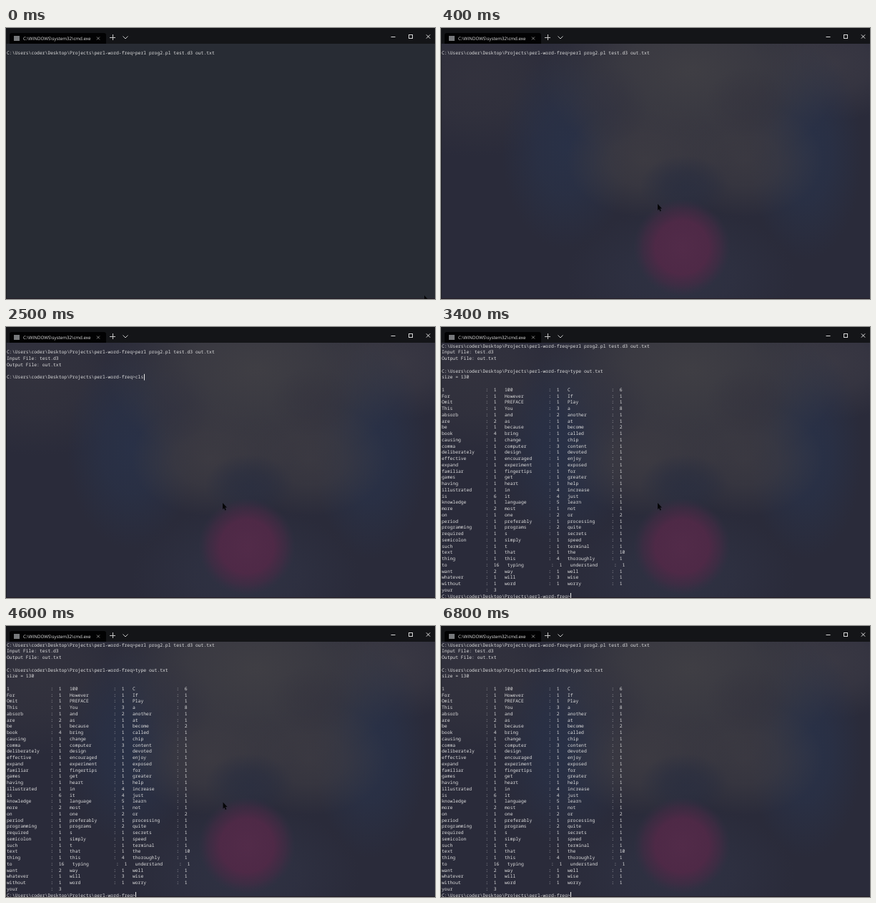
Recreate the animation shown at these times as an HTML page with a canvas. Size 600x379 px, loop 7.2 s.

```html
<!DOCTYPE html>
<html lang="en">
<head>
<meta charset="utf-8">
<title>Terminal</title>
<style>
html, body { margin: 0; width: 100%; height: 100%; overflow: hidden; background: #282c34; }
canvas { display: block; }
</style>
</head>
<body>
<canvas id="stage" width="600" height="379"></canvas>
<script>
const W = 600, H = 379, LOOP = 7200, STEP = 100, BAR = 22;
const CELL = 3.83, ROW = 8.75, LEFT = 1, FIRST = 26.4;
const ctx = document.getElementById('stage').getContext('2d');

const PROMPT = 'C:\\Users\\coder\\Desktop\\Projects\\perl-word-freq>';
const RUN = 'perl prog2.pl test.d3 out.txt';
const TYPE = 'type out.txt';
const REPORT = ['Input File: test.d3', 'Output File: out.txt', ''];

// Words with their counts; a missing count means 1.
const WORDS = `1 100 C=6 For However If Omit PREFACE Play This You=3 a=8
absorb and=2 another are=2 as at be because become=2 book=4 bring called
causing change chip comma computer=3 content deliberately design devoted
effective encouraged enjoy expand experiment exposed familiar fingertips for
games get greater having heart help illustrated in=4 increase is=6 it=4 just
knowledge language=5 learn more=2 most not on one=2 or=2 period preferably processing
programming programs=2 quite required s secrets semicolon simply speed such t terminal
text that the=10 thing this=4 thoroughly to=16 typing understand want=2 way well
whatever will=3 wise without word worry your=3`.split(/\s+/);

function wordTable() {
  const cells = WORDS.map(entry => {
    const [word, count = '1'] = entry.split('=');
    return word.padEnd(16) + ':  ' + count + '   ';
  });
  const rows = [];
  for (let i = 0; i < cells.length; i += 3) rows.push(cells.slice(i, i + 3).join(''));
  return rows;
}

const LISTING = [PROMPT + RUN, ...REPORT, PROMPT + TYPE, 'size = 130', '', ...wordTable(), PROMPT];

// Terminal content: [start time, lines, caret shown]
const shell = input => ['', PROMPT + RUN, ...REPORT, PROMPT + input];
const SCREENS = [
  [0, ['', PROMPT + RUN], false],
  [1300, shell(''), true],
  [1800, shell(RUN), true],
  [2300, shell(TYPE), true],
  [2500, shell('cls'), true],
  [2900, shell(TYPE), true],
  [3400, LISTING, true],
  [4000, LISTING, false],
  [4600, LISTING, true],
  [5100, LISTING, false],
  [5700, LISTING, true],
  [6200, LISTING, false],
  [6800, LISTING, true]
];

// Pointer path: [time, x, y]
const PATH = [
  [0, 585, 374], [300, 303, 246], [4500, 303, 246], [4600, 303.5, 246.5],
  [4900, 303.5, 246.5], [5300, 305, 248], [5400, 305, 248], [5700, 308, 250],
  [5900, 308, 250], [6000, 309, 258], [6300, 312, 380], [LOOP, 312, 380]
];

// Wallpaper glow: [x, y, rx, ry, rgb, strength]
const GLOWS = [
  [45, 70, 150, 110, '54,53,63', .7],
  [550, 50, 110, 80, '62,60,70', .75],
  [175, 170, 90, 140, '41,50,73', .85],
  [510, 175, 80, 150, '41,50,73', .9],
  [350, 60, 210, 140, '63,62,68', 1],
  [285, 185, 110, 80, '62,60,67', .9],
  [425, 185, 110, 80, '62,60,67', .8],
  [235, 110, 55, 60, '51,51,64', .5],
  [430, 105, 60, 50, '52,51,62', .5],
  [340, 222, 62, 44, '43,47,64', .9],
  [335, 350, 160, 100, '49,52,70', .7]
];

function glow(x, y, rx, ry, stops) {
  ctx.save();
  ctx.translate(x, y);
  ctx.scale(rx, ry);
  const fill = ctx.createRadialGradient(0, 0, 0, 0, 0, 1);
  stops.forEach(([at, color]) => fill.addColorStop(at, color));
  ctx.fillStyle = fill;
  ctx.fillRect(-1, -1, 2, 2);
  ctx.restore();
}

function rect(color, x, y, w, h) {
  ctx.fillStyle = color;
  ctx.fillRect(x, y, w, h);
}

function stroke(color, width, ...lines) {
  ctx.strokeStyle = color;
  ctx.lineWidth = width;
  ctx.beginPath();
  for (const line of lines) line.forEach(([x, y], i) => i ? ctx.lineTo(x, y) : ctx.moveTo(x, y));
  ctx.stroke();
}

const cross = (x, y, r) => [
  [[x - r, y - r], [x + r, y + r]],
  [[x + r, y - r], [x - r, y + r]]
];

function drawWallpaper(alpha) {
  if (!alpha) return;
  ctx.globalAlpha = alpha;
  rect('#2a2b3a', 0, 0, W, H);
  for (const [x, y, rx, ry, rgb, k] of GLOWS) {
    glow(x, y, rx, ry, [[0, `rgba(${rgb},${k})`], [.45, `rgba(${rgb},${k * .75})`], [1, `rgba(${rgb},0)`]]);
  }
  glow(337, 307, 68, 68, [
    [0, 'rgba(82,43,73,1)'], [.55, 'rgba(80,41,71,.95)'],
    [.8, 'rgba(72,42,69,.55)'], [1, 'rgba(60,45,68,0)']
  ]);
  ctx.globalAlpha = 1;
}

function drawTitleBar() {
  rect('#141518', 0, 0, W, BAR);
  ctx.fillStyle = '#020203';
  ctx.beginPath();
  ctx.roundRect(5, 7, 135, BAR - 7, [3, 3, 0, 0]);
  ctx.fill();
  rect('#77797c', 11, 11, 8, 7);

  ctx.font = '6.2px "Open Sans", sans-serif';
  ctx.fillStyle = '#e6e6e6';
  ctx.fillText('C:\\WINDOWS\\system32\\cmd.exe', 24, 17);

  stroke('#a0a0a0', .8, ...cross(129, 14.5, 2));
  stroke('#c8c8c8', 1, [[145, 13.5], [153, 13.5]], [[149.5, 9], [149.5, 17]]);
  stroke('#c8c8c8', 1, [[163.5, 11.5], [167, 15], [170.5, 11.5]]);
  stroke('#d8d8d8', 1, [[538.5, 12.5], [544.5, 12.5]]);
  ctx.strokeRect(563.5, 9.5, 5, 5);
  stroke('#e0e0e0', 1, ...cross(590.5, 12, 2.6));
}

function drawTerminal(lines, caret) {
  ctx.font = `${CELL / .6}px "Noto Sans Mono", monospace`;
  ctx.fillStyle = '#dedede';
  lines.forEach((line, i) => ctx.fillText(line, LEFT, FIRST + i * ROW + 2.2));
  if (caret) {
    const last = lines.length - 1;
    rect('#e8e8e8', Math.round(LEFT + lines[last].length * CELL), FIRST + last * ROW - 4.4, 1, ROW);
  }
}

function drawPointer(x, y) {
  const shape = [[0, 0], [0, 9], [2, 7.2], [3.4, 10.4], [4.8, 9.8], [3.5, 6.6], [6, 6.4]];
  ctx.beginPath();
  shape.forEach(([dx, dy]) => ctx.lineTo(x + dx, y + dy));
  ctx.closePath();
  ctx.fillStyle = '#060608';
  ctx.fill();
}

function pointerAt(t) {
  const i = PATH.findIndex(([time]) => time > t);
  const [t0, x0, y0] = PATH[i - 1], [t1, x1, y1] = PATH[i];
  const k = (t - t0) / (t1 - t0);
  return [x0 + (x1 - x0) * k, y0 + (y1 - y0) * k];
}

function wallpaperAt(t) {
  if (t < 300) return 0;
  return t < 400 ? .06 : 1;
}

function render(time) {
  const t = Math.floor((time % LOOP) / STEP) * STEP;
  const [, lines, caret] = SCREENS.findLast(([start]) => start <= t);
  rect('#282c34', 0, 0, W, H);
  drawWallpaper(wallpaperAt(t));
  rect('#1b1c22', 0, BAR, 1, H - BAR);
  rect('#241d25', 0, H - 1, W, 1);
  drawTitleBar();
  drawTerminal(lines, caret);
  drawPointer(...pointerAt(t));
}

ctx.textRendering = 'geometricPrecision';
const start = performance.now();
function tick() {
  render(performance.now() - start);
  requestAnimationFrame(tick);
}
tick();
</script>
</body>
</html>
```
